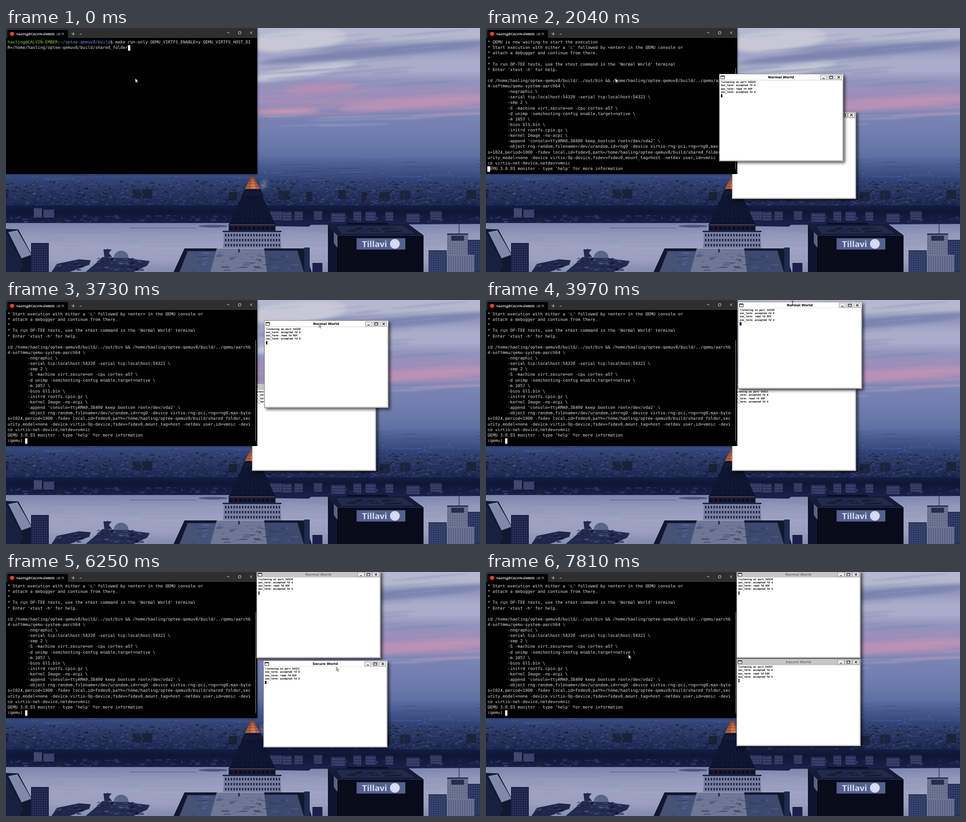
These frames come from a looping animation (1041 px wide and 538 px high, 8000 ms). An HTML page with a canvas:

```html
<!DOCTYPE html>
<html lang="en">
<head>
<meta charset="utf-8">
<title>Terminal session</title>
<style>
html, body { margin: 0; width: 100%; height: 100%; overflow: hidden; background: #2c3d70; }
body > *, pre, .caret, svg { position: absolute; left: 0; top: 0; }
pre { margin: 0; white-space: pre; text-rendering: geometricPrecision; }
#edge, #term { width: 551.5px; height: 321.5px; }
#edge { box-shadow: 0 1px 5px rgba(10,15,40,.55); }
#term { background: #000; overflow: hidden; z-index: 2; }
#term pre { left: 3.4px; top: 26px; color: #e0e0e0; font: 9.155px/12.13px "DejaVu Sans Mono", monospace; }
#term .u { color: #7fdc2a; }
#term .p { color: #6c9be0; }
#term .caret { width: 5.5px; height: 12px; background: #fff; }
#bar { position: absolute; left: 547.5px; top: 89px; width: 1.3px; height: 222px; background: #a4a4a4; }
.win { box-sizing: border-box; width: 273px; height: 192.5px; background: #fff;
  border: solid #d2d2d2; border-width: 0 3px 3px 2px; outline: 1px solid #8f8f8f; outline-offset: -1px;
  box-shadow: 4px 4px 6px rgba(0,0,0,.6); }
.win svg { left: -2px; }
.win pre { left: 2px; top: 16.2px; color: #000; font: 5.49px/7.2px "DejaVu Sans Mono", monospace; -webkit-text-stroke: .2px #000; }
.win .caret { left: 2px; top: 45.2px; width: 3.4px; height: 7px; box-sizing: border-box; background: #000; border: .8px solid #000; }
.win .head { fill: #fff; }
.win.idle .head { fill: #c6c6c6; }
.win.idle text { fill: #777; }
.win.idle .caret { background: #fff; }
#mouse { overflow: visible; z-index: 9; }
</style>
</head>
<body>
<canvas id="photo" width="1041" height="538"></canvas>
<div id="edge"></div>
<div id="term">
  <svg width="552" height="22" fill="none" stroke="#e8e8e8" stroke-width=".9">
    <path d="M0 0H552V22H0Z" fill="#2f2f2f" stroke="none"/>
    <path d="M3 22V7Q3 4.5 5.5 4.5H133.5Q136 4.5 136 7V22Z" fill="#000" stroke="none"/>
    <circle cx="13.3" cy="13" r="4.6" fill="#d9481f" stroke="none"/>
    <text x="23" y="15.7" fill="#fff" stroke="none" font-size="7.1" font-weight="600" font-family="Open Sans, sans-serif">haoling@CALVIN-EMBER: ~/c</text>
    <path d="M122.3 10.5l5 5m0-5l-5 5M144 13h7.5m-3.75-3.75v7.5M161.5 12l2.3 2.3 2.3-2.3M485.3 10.5h5.5M510.7 8h5v5h-5zM535.8 7.8l5.2 5.2m0-5.2l-5.2 5.2"/>
  </svg>
  <pre id="out"></pre>
  <div class="caret" id="caret"></div>
  <div id="bar"></div>
</div>
<svg id="mouse" width="1" height="1"><path id="pointer"/></svg>
<script>
const $ = id => document.getElementById(id);

// ---- backdrop: dusk over a river city ----
const c = $('photo').getContext('2d');
let seed = 7;
const rnd = (a = 0, b = 1) => a + (b - a) * (seed = seed * 16807 % 2147483647) / 2147483647;
const navy = (l, a = 1) => `hsla(226,36%,${l}%,${a})`;
const rect = (color, x, y, w, h) => { c.fillStyle = color; c.fillRect(x, y, w, h); };
const poly = (color, ...p) => {
  c.fillStyle = color;
  c.beginPath();
  for (let i = 0; i < p.length; i += 2) c.lineTo(p[i], p[i + 1]);
  c.fill();
};
const oval = (color, x, y, rx, ry, turn = 0) => {
  c.fillStyle = color;
  c.beginPath();
  c.ellipse(x, y, rx, ry, turn, 0, 7);
  c.fill();
};
// evenly spaced colours from top to bottom
const fade = (y, h, ...colors) => {
  const g = c.createLinearGradient(0, y, 0, y + h);
  colors.forEach((color, i) => g.addColorStop(i / (colors.length - 1), color));
  rect(g, -60, y, 1200, h);
};
// random strips inside a band
const scatter = (n, [x0, x1], [y0, y1], [w0, w1], [h0, h1], [l0, l1], alpha = .7) => {
  for (let i = 0; i < n; i++) rect(navy(rnd(l0, l1), alpha), rnd(x0, x1), rnd(y0, y1), rnd(w0, w1), rnd(h0, h1));
};
const grid = (color, dot, x, y, w, h, stepX = 5, stepY = 5) => {
  rect(color, x, y, w, h);
  for (let j = y + 4; j < y + h - 2; j += stepY)
    for (let i = x + 3; i < x + w - 2; i += stepX) rect(dot, i, j, stepX / 2, stepY / 2);
};
const wide = [-30, 1041];

function sky() {
  fade(0, 330, '#b5b8ce', '#b5b8ce', '#9498bf', '#a9adca', '#a9acca', '#9093bd', '#988fba', '#a08eb7', '#8187b6',
    '#7681b2', '#707eaf', '#6878a9', '#5d70a2', '#465a8d', '#374a80');
  c.filter = 'blur(4px)';
  oval('#c6c8d5', 640, 28, 110, 24, -.1);
  oval('#7c84b0', 820, 53, 270, 11, -.09);
  oval('#c3c5d5', 640, 98, 130, 11, -.15);
  oval('#b18eb4', 690, 133, 80, 12, -.08);
  oval('#b692b6', 910, 164, 180, 13, -.08);
  oval('#cd98b2', 615, 184, 75, 6, -.03);
  c.filter = 'blur(1.5px)';
  for (let i = 0; i < 70; i++) {
    const y = rnd(0, 215), pink = y > 125 && y < 190;
    oval(pink ? 'rgba(203,150,180,.2)' : i % 2 ? 'rgba(110,120,168,.24)' : 'rgba(200,203,220,.22)',
      rnd(560, 1041), y, rnd(30, 110), rnd(1, 3), -.1 + y / 3000);
  }
  c.filter = 'none';
  rect('#545c80', 567, 199, 8, 1);
}

function city() {
  fade(330, 64, '#34467a', '#26355f', '#1a2650');
  scatter(80, wide, [290, 336], [15, 80], [1, 1], [25, 56], .5);
  scatter(1900, wide, [336, 392], [2, 8], [1, 3], [10, 42]);
  scatter(11, wide, [352, 362], [8, 26], [20, 20], [13, 15]);
  for (let i = 0; i < 150; i++) rect(`rgba(232,208,205,${rnd(.3, .9)})`, rnd(0, 1041), rnd(316, 390), 1.2, 1);
  fade(391, 43, '#141d42', '#0e1636', '#131c40', '#18224a');
  scatter(160, wide, [412, 426], [3, 12], [2, 6], [12, 34]);
  for (let x = 575; x < 940; x += rnd(26, 60)) grid('#28325a', '#4a5480', x, rnd(402, 409), rnd(16, 32), 20, 4, 6);
  grid('#3d446b', '#525a80', 61, 397, 18, 21);
  grid('#343d66', '#4a5380', 82, 400, 24, 18);
}

function river() {
  fade(430, 108, '#7b84ab', '#9299ba', '#9fa3c1', '#9ca0bf', '#868cae');
  scatter(200, wide, [431, 538], [20, 90], [1, 1], [48, 76], .18);
  poly('#18214a', 590, 428, 1041, 428, 1041, 432, 670, 434, 665, 438, 590, 437);
  rect('#5f6a92', 272, 440, 145, 1.5);
  oval('#4a557e', 455, 437, 32, 3);
  // piers
  poly('#1e274b', 100, 538, 112, 520, 160, 510, 186, 512, 183, 522, 140, 538);
  poly('#212a4f', 175, 538, 196, 520, 212, 505, 270, 508, 316, 514, 310, 524, 280, 538);
  oval('#5b6587', 253, 506, 16, 15);
  rect('#272f54', 237, 507, 34, 12);
  scatter(25, [105, 165], [513, 532], [3, 12], [1, 4], [10, 40]);
  scatter(60, [196, 295], [506, 532], [3, 12], [1, 5], [10, 46]);
  rect('#1b2448', 222, 487, 2, 30);
  poly('#202a50', 214, 488, 232, 488, 226, 496, 233, 505, 216, 505);
}

function tower() {
  c.filter = 'blur(4px)';
  oval('rgba(175,180,205,.5)', 566, 345, 6, 11, .5);
  c.filter = 'none';
  poly('#0e1430', 526, 354, 558, 354, 564, 364, 565, 376, 580, 408, 592, 434, 592, 450, 489, 450, 489, 434, 501, 408, 516, 376, 519, 364);
  poly('#c2663f', 541, 323, 558, 355, 525, 355);
  poly('#e8935c', 541, 326, 549, 354, 537, 354);
  const ribs = (color, y0, y1, spread0, spread1) => {
    c.strokeStyle = color;
    c.lineWidth = .7;
    c.beginPath();
    for (let i = -4; i < 5; i++) { c.moveTo(541 + i * spread0, y0); c.lineTo(541 + i * spread1, y1); }
    c.stroke();
  };
  ribs('#69372f', 323, 355, 0, 4);
  for (let y = 331; y < 355; y += 6) rect('#69372f', 541 - (y - 323) / 2, y, y - 323, .7);
  ribs('#333b58', 360, 370, 5, 5);
  ribs('#1b2341', 376, 432, 5, 11);
  rect('#594643', 492, 433, 98, 2);
  grid('#141a34', '#080c1e', 489, 435, 103, 13, 10, 12);
  poly('#7b80a0', 480, 449, 602, 449, 605, 488, 476, 488);
  grid('#7b80a0', '#1b2343', 478, 450, 124, 37, 6.2, 11);
  rect('#1c2444', 476, 447, 129, 3);
  // roof terrace
  poly('#10172f', 392, 486, 655, 486, 671, 538, 368, 538);
  poly('#465276', 399, 492, 463, 492, 450, 538, 381, 538);
  poly('#3d4a6e', 568, 491, 640, 491, 654, 538, 573, 538);
  poly('#6f7795', 463, 485, 567, 485, 573, 538, 449, 538);
  rect('#a2a6bb', 464, 485, 102, 1.5);
  scatter(70, [405, 630], [494, 535], [3, 18], [1, 3], [16, 56], .55);
  rect('#1a2345', 510, 487, 3, 8);
  rect('#202a50', 655, 484, 12, 54);
  rect('#182147', 673, 518, 22, 20);
}

function blocks() {
  // left edge
  poly('#10182f', 0, 443, 27, 444, 58, 502, 74, 505, 74, 538, 0, 538);
  poly('#8089a9', 5, 450, 25, 446, 56, 500, 34, 508);
  poly('#18203e', 0, 452, 38, 520, 30, 538, 0, 538);
  grid('#1a2347', '#303b63', 55, 474, 39, 64);
  // dark office block with the sign
  poly('#141b38', 707, 433, 883, 432, 917, 457, 727, 458);
  poly('#222a4c', 725, 437, 872, 436, 898, 453, 738, 454);
  rect('#0b1025', 748, 429, 90, 5);
  scatter(25, [735, 850], [438, 449], [6, 24], [2, 4], [8, 28]);
  poly('#0e142b', 707, 433, 727, 458, 727, 538, 707, 538);
  rect('#070a18', 727, 457, 190, 81);
  rect('#2e3656', 727, 457, 190, 1);
  poly('#59648d', 720, 450, 728, 458, 728, 485, 720, 474);
  for (let x = 732; x < 916; x += 7) rect('#0d1225', x, 460, 1, 78);
  rect('#52618f', 770, 463.5, 107, 25);
  c.fillStyle = '#d5daee';
  c.font = 'bold 18.5px "Open Sans", sans-serif';
  c.fillText('Tillavi', 782, 483);
  oval('#d5daee', 854, 476, 10.7, 10.7);
  // right edge
  grid('#2c3861', '#465279', 928, 490, 40, 48);
  rect('#3c2f45', 994.5, 433, 1.5, 20);
  grid('#646b8a', '#7a829e', 969, 453, 46, 47);
  rect('#262e4e', 969, 453, 46, 3);
  rect('#252e50', 978, 458, 28, 11);
  grid('#27325c', '#414d74', 1014, 467, 27, 71);
  rect('#6c7594', 968, 500, 61, 38);
  for (let x = 972; x < 1028; x += 5) rect('#4b557b', x, 503, 1.5, 35);
}
[sky, city, river, tower, blocks].forEach(draw => draw());

// ---- small windows ----
const addWin = (title, port) => {
  const w = document.createElement('div');
  const button = (x, mark) => `<path d="M${x} 2.7h14v10h-14z" fill="#e9e9e9" stroke="#888" stroke-width=".8"/>
    <path d="${mark}" transform="translate(${x} 2.7)" fill="none" stroke="#000" stroke-width="1.1"/>`;
  w.innerHTML = `<svg width="273" height="14.5"><path class="head" d="M1 1H272V14H1Z"/><path d="M1 14H272" stroke="#bbb" stroke-width=".8"/>
    <path d="M3.5 4.5h8.5v6.5h-8.5z" fill="#fff" stroke="#000" stroke-width=".9"/><path d="M3.5 5h8.5" stroke="#000" stroke-width="1.8"/>
    <text x="136" y="9.7" text-anchor="middle" font-size="7.35" font-weight="bold" font-family="DejaVu Sans, sans-serif">${title}</text>
    ${button(222.5, 'M4.5 7.5h5')}${button(239, 'M3.5 2.5h7v5h-7zM3.5 3h7')}${button(255.5, 'M4.5 2.5l5 5m0-5l-5 5')}</svg>
    <pre>listening on port ${port}\nsoc_term: accepted fd 4\nsoc_term: read fd EOF\nsoc_term: accepted fd 4</pre><div class="caret"></div>`;
  w.className = 'win';
  document.body.append(w);
  return w;
};
const normal = addWin('Normal World', 54320), secure = addWin('Secure World', 54321);

// ---- terminal output ----
const home = '/home/haoling/optee-qemuv8/build', pad = ' '.repeat(8);
const lines = `<span class="u">haoling@CALVIN-EMBER</span>:<span class="p">~/optee-qemuv8/build</span>$ make run-only QEMU_VIRTFS_ENABLE=y QEMU_VIRTFS_HOST_DI
R=${home}/shared_folder

*
* QEMU is now waiting to start the execution
* Start execution with either a 'c' followed by &lt;enter&gt; in the QEMU console or
* attach a debugger and continue from there.
*
* To run OP-TEE tests, use the xtest command in the 'Normal World' terminal
* Enter 'xtest -h' for help.

cd ${home}/../out/bin &amp;&amp; ${home}/../qemu/aarch6
4-softmmu/qemu-system-aarch64 \\
${pad}-nographic \\
${pad}-serial tcp:localhost:54320 -serial tcp:localhost:54321 \\
${pad}-smp 2 \\
${pad}-S -machine virt,secure=on -cpu cortex-a57 \\
${pad}-d unimp -semihosting-config enable,target=native \\
${pad}-m 1057 \\
${pad}-bios bl1.bin \\
${pad}-initrd rootfs.cpio.gz \\
${pad}-kernel Image -no-acpi \\
${pad}-append 'console=ttyAMA0,38400 keep_bootcon root=/dev/vda2' \\
${pad}-object rng-random,filename=/dev/urandom,id=rng0 -device virtio-rng-pci,rng=rng0,max-byte
s=1024,period=1000 -fsdev local,id=fsdev0,path=${home}/shared_folder,sec
urity_model=none -device virtio-9p-device,fsdev=fsdev0,mount_tag=host -netdev user,id=vmnic -devi
ce virtio-net-device,netdev=vmnic
QEMU 3.0.93 monitor - type 'help' for more information
(qemu) `.split('\n');

function drawTerm(t) {
  const full = t < 840 ? 1 : t < 1120 ? 2 : t < 2190 ? 27 : 28; // rows above the caret
  const col = t < 840 ? 48 : t < 2190 ? 0 : 7;
  const tail = t >= 840 && t < 2040 ? '' : lines[full];
  const text = [...lines.slice(0, full), tail].slice(-24).join('\n');
  if (drawTerm.last !== text) $('out').innerHTML = drawTerm.last = text;
  $('caret').style.cssText = `left:${3.4 + col * 5.512}px;top:${26 + Math.min(full, 23) * 12.13}px`;
  $('caret').hidden = t >= 560 && t < 840;
  $('bar').hidden = t < 1120;
}

// ---- motion: eased in n visible steps, sway is a damped overshoot ----
const move = (t, start, end, n, power, delta, sway = [0, 0]) => {
  const p = t < start ? 0 : Math.min(n, 1 + Math.floor((t - start) / (end - start) * (n - 1))) / n;
  const ease = 1 - (1 - p) ** power, swing = Math.sin(2 * Math.PI * p) * (1 - p) ** 3;
  return delta.map((d, i) => d * ease + sway[i] * swing);
};
const add = (...points) => points.reduce(([a, b], [x, y]) => [a + x, b + y]);
const dragNormal = (t, dy) => move(t, 3610, 4520, 7, 5, [38, dy], [70, 0]);
const dragSecure = t => move(t, 6250, 7240, 8, 5, [9.7, 7], [43, 16]);
const mouseAt = t => add([284, 111],
  move(t, 2190, 3340, 9, 3, [348, 1]), dragNormal(t, -112),
  move(t, 4790, 5160, 4, 3, [21, 268]), move(t, 5310, 5820, 4, 3, [9, -70]), dragSecure(t),
  move(t, 7360, 7810, 4, 3, [-396.7, -23]));

const arrow = 'M0 0V9.2L2.1 7.3 3.7 10.7 5 10.1 3.5 6.8H6.3Z';
const pointers = {
  arrow: [arrow, '#fff', '#000', .5],
  grey: [arrow, '#b5b5b5', '#707070', .7],
  beam: ['M-2.2-4h4.4M0-4v8M-2.2 4h4.4', 'none', '#111', 1]
};
const place = (w, [x, y], z, idle) => {
  w.style.cssText = `left:${x}px;top:${y}px;z-index:${z}`;
  w.classList.toggle('idle', idle);
};

function frame(now) {
  const t = now % 8000, raised = t >= 4790;
  drawTerm(t);

  const spots = [add([512, 101], dragNormal(t, -103.5)), add([540, 184], dragSecure(t))];
  place(normal, spots[0], 3, raised);
  place(secure, spots[1], raised ? 4 : 1, !raised || t >= 7810);
  normal.hidden = t < 980;
  secure.hidden = t < 1260;
  secure.querySelector('.caret').hidden = t < 6250;

  // the pointer depends on what lies under it
  const [x, y] = mouseAt(t);
  const inWin = spots.some(([l, top]) => x > l && x < l + 273 && y > top && y < top + 192);
  const onTitle = spots.some(([, top]) => y > top + 5 && y < top + 15);
  const [d, fill, stroke, width] = pointers[!inWin ? 'arrow' : onTitle ? 'grey' : 'beam'];
  Object.entries({ d, fill, stroke, 'stroke-width': width, transform: `translate(${x} ${y})` })
    .forEach(([k, v]) => $('pointer').setAttribute(k, v));
  requestAnimationFrame(frame);
}
requestAnimationFrame(frame);
</script>
</body>
</html>
```
